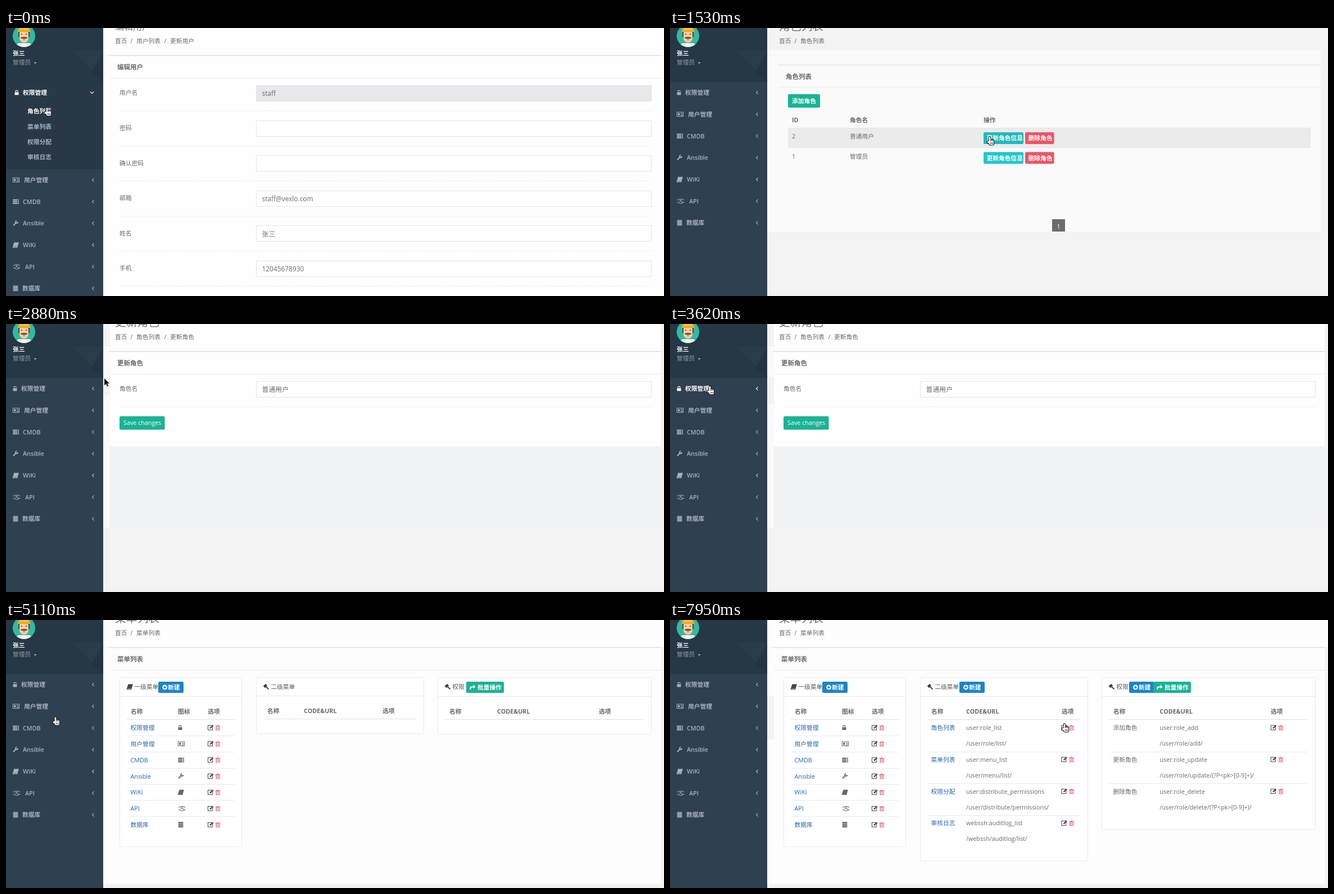
An HTML page with a canvas that plays this animation: 1171 px wide and 478 px high, repeating every 8000 ms.

```html
<!DOCTYPE html>
<html lang="zh-CN">
<head>
<meta charset="utf-8">
<title>权限管理</title>
<style>
html, body { margin: 0; width: 100%; height: 100%; overflow: hidden; background: #f3f3f4; }
canvas { display: block; width: 1171px; height: 478px; }
</style>
</head>
<body>
<canvas id="stage"></canvas>
<script>
const W = 1171, H = 478, LOOP = 8000;
const canvas = document.getElementById('stage');
const dpr = window.devicePixelRatio || 1;
canvas.width = W * dpr;
canvas.height = H * dpr;
const g = canvas.getContext('2d');

const FONT = '"Open Sans","Noto Sans CJK SC","Noto Sans CJK",sans-serif';
const GREY = '#676a6c', DARK = '#3f4244', LINE = '#e7eaec', BACK = '#f3f3f4', PAPER = '#fefefe';
const TEAL = '#1ab394', BLUE = '#1c84c6', RED = '#ed5565', LINK = '#2768a6', SIDE = '#a7b1c2';
const BASE = 10.75, PITCH = 38.7;

function rect(x, y, w, h, color, r = 0) {
  g.fillStyle = color;
  g.beginPath();
  g.roundRect(x, y, w, h, r);
  g.fill();
}

function frame(x, y, w, h, color, r = 0) {
  g.strokeStyle = color;
  g.lineWidth = 1;
  g.beginPath();
  g.roundRect(x + .5, y + .5, w - 1, h - 1, r);
  g.stroke();
}

function hline(x1, x2, y, color = LINE) { rect(x1, y, x2 - x1, 1, color); }

// y is the optical middle of the text
function text(s, x, y, color = GREY, weight = 400, size = BASE) {
  g.font = `${weight} ${size}px ${FONT}`;
  g.fillStyle = color;
  g.fillText(s, x, y + size * .37);
}

function trace(p) {
  g.beginPath();
  for (let i = 0; i < p.length; i += 2) g.lineTo(p[i], p[i + 1]);
}

function poly(color, ...p) {
  g.fillStyle = color;
  trace(p);
  g.fill();
}

// icon parts, in the current colour around 0,0
const bar = (x, y, w, h, r) => rect(x, y, w, h, g.fillStyle, r);
const box = (x, y, w, h) => g.strokeRect(x, y, w, h);

function pen(width, ...p) {
  g.lineWidth = width;
  trace(p);
  g.stroke();
}

function ring(x, y, r, from, to) {
  g.beginPath();
  g.arc(x, y, r, from, to);
  g.stroke();
}

function lock() {
  bar(-3.5, -.8, 7, 5);
  g.lineWidth = 1.4;
  ring(0, -1.7, 2.1, Math.PI, 0);
}
function card() {
  box(-5.7, -3.8, 11.4, 7.6);
  bar(-4, -2, 3.4, 4);
  for (let y = -2; y < 3; y += 2) bar(1, y, 3.4, 1);
}
function server() {
  for (let y = -4.2; y < 3; y += 3.1) {
    bar(-5.4, y, 8, 2.3);
    bar(3.4, y, 2, 2.3);
  }
}
function wrench() {
  pen(2, -4, 4, 1, -1);
  ring(2.2, -2.2, 2, 0, 4.7);
}
function book() {
  g.transform(1, 0, -.3, 1, 0, 0);
  bar(-4, -4.6, 8.5, 7.4);
  box(-3.6, 3, 7.8, 1.4);
}
function shake() {
  pen(1.1, -6, -2, -2, -3.4, 3, -3.4, 6, -2);
  pen(1.1, -6, 1.5, -1, 4, 2, 4, 6, 1.5);
  pen(1.1, 1, -3, -1.5, 0, 1, 0, 4, 2);
}
function disks() {
  for (let y = -5; y < 4; y += 2.6) bar(-4.6, y, 9.2, 2.1, 1);
}
function edit() {
  box(-4.6, -4, 8, 8);
  pen(2.2, -1, 1.2, 4.6, -4);
}
function trash() {
  box(-3, -2.4, 6, 6.6);
  pen(1, -4.2, -2.7, 4.2, -2.7);
  for (let x = -1; x < 2; x += 2) pen(.9, x, -1, x, 3);
  bar(-1.5, -4.4, 3, 1);
}
function gavel() {
  g.rotate(Math.PI / 4);
  bar(-4.5, -3, 4.6, 6);
  bar(0, -1, 6.5, 2);
}
function plus() {
  bar(-4.4, -4.4, 8.8, 8.8, 4.4);
  g.fillStyle = BLUE;
  bar(-2.6, -.8, 5.2, 1.6);
  bar(-.8, -2.6, 1.6, 5.2);
}
function share() {
  pen(2.2, -4.2, 4, -3.6, 0, 1, -1);
  poly('#fff', 1, -4.4, 5.2, -.9, 1, 2.6);
}
function left() { pen(1.1, 1.5, -3, -1.5, 0, 1.5, 3); }
function down() { pen(1.2, -3, -1.5, 0, 1.5, 3, -1.5); }

function icon(shape, x, y, color = GREY) {
  g.save();
  g.translate(x, y);
  g.fillStyle = g.strokeStyle = color;
  g.lineWidth = 1;
  shape();
  g.restore();
}

function button(x, y, w, h, color, label, tx, ico, weight = 600) {
  rect(x, y, w, h, color, 2.5);
  if (ico) icon(ico, x + 11.5, y + h / 2, '#fff');
  text(label, tx, y + h / 2, '#fff', weight);
}

// label, text x, icon, icon x
const MENU = [
  ['权限管理', 27, lock, 16], ['用户管理', 32, card, 18], ['CMDB', 30, server, 17.5],
  ['Ansible', 30, wrench, 17], ['WiKi', 30, book, 17], ['API', 34, shake, 19],
  ['数据库', 29, disks, 17]
];
const SUBMENU = ['角色列表', '菜单列表', '权限分配', '审核日志'];

function avatar() {
  g.save();
  g.beginPath();
  g.arc(32, 14, 20, 0, 7);
  g.clip();
  rect(12, -6, 40, 40, '#2fbba3');
  rect(19, 27, 26, 9, '#f4f4ee', 5);
  rect(22, 6, 20, 11, '#5d3a2b', 3);
  rect(24, 2, 16, 24, '#fbcfa5', 8);
  rect(23, -7, 18, 14, '#fcc92f', 8);
  rect(20, 3, 24, 4, '#f2a922', 2);
  for (const x of [27, 35]) rect(x, 10, 2, 2, '#40312b', 1);
  rect(26.5, 16, 11, 3, '#734330', 1.5);
  rect(29.5, 20, 5, 1.6, '#e8574f', .8);
  g.restore();
}

// open: how many pixels the submenu pushes the rest down
function sidebar(open, hot, hover) {
  rect(0, 0, 173, H, '#2f4050');
  rect(0, 0, 173, 96, '#263746');
  poly('#2a3b4a', 118, 40, 173, 40, 155, 78);
  poly('#233341', 173, 45, 173, 96, 150, 80);
  avatar();
  text('张三', 12, 45, '#fff', 700);
  text('管理员', 12, 61.5, '#8c9cab');
  poly('#8c9cab', 49, 61, 55, 61, 52, 64);
  if (open) rect(0, 96, 173, 39 + open, '#293846');
  MENU.forEach(([label, x, ico, ix], i) => {
    const active = open && !i, y = 115.2 + i * PITCH + (i ? open : 0);
    const c = active || (hover && !i) ? '#fff' : SIDE, dx = active ? 3 : 0;
    icon(ico, ix + dx, y, c);
    text(label, x + dx, y, c, 600);
    icon(active ? down : left, active ? 153 : 155, y, c);
  });
  if (!open) return;
  g.save();
  g.beginPath();
  g.rect(0, 130, 173, open + 5);
  g.clip();
  SUBMENU.forEach((s, i) => text(s, 38, 148.5 + i * 27.1, i === hot ? '#fff' : SIDE, 600));
  g.restore();
}

function heading(title, crumbs, size = 19.8) {
  text(title, 194, -3.4, GREY, 100, size);
  crumbs.forEach((c, i) => {
    const x = [194, 232, 292][i];
    if (i) text('/', x - 10.5, 23);
    text(c, x, 23);
  });
}

function panel(title) {
  hline(173, W, 48, '#eeeff0');
  rect(185, 48, 980, 2, '#e4e6e8');
  text(title, 198, 70, GREY, 600, 11.5);
  hline(185, 1165, 89);
}

function field(i, label, value, off) {
  const y = 102 + i * 62.6, foot = Math.round(y + 45) + .5;
  text(label, 202, y + 13.5);
  rect(445, y, 704, 28.5, off ? '#e6e9ec' : '#fff');
  frame(445, Math.round(y), 704, 29, '#e2e4e7');
  text(value, 455.5, y + 15, GREY, 400, 11.9);
  g.strokeStyle = LINE;
  g.setLineDash([2.5, 2]);
  pen(1, 202, foot, 1149, foot);
  g.setLineDash([]);
}

function userPage() {
  rect(173, 0, 998, H, PAPER);
  heading('编辑用户', ['首页', '用户列表', '更新用户'], 16);
  panel('编辑用户');
  const fields = [['用户名', 'staff', true], ['密码', ''], ['确认密码', ''],
    ['邮箱', 'staff@vexlo.com'], ['姓名', '张三'], ['手机', '12045678930']];
  fields.forEach((f, i) => field(i, ...f));
}

function rolesBack() {
  rect(173, 0, 998, H, BACK);
  rect(173, 40, 985, 323, '#fafafa');
  hline(173, W, 475);
}

function rolesPage(t) {
  const hover = t >= 1210;
  rolesBack();
  heading('角色列表', ['首页', '角色列表']);
  hline(173, W, 48, '#efeff0');
  rect(193, 65, 965, 2, LINE);
  text('角色列表', 206, 86.5, GREY, 600, 11.5);
  hline(193, 1158, 105);
  button(210, 118, 57, 24, TEAL, '添加角色', 217);
  text('ID', 217, 164.5, GREY, 700);
  text('角色名', 320, 164.5, GREY, 600);
  text('操作', 558, 164.5, GREY, 600);
  hline(210, 1140, 178, '#e4e4e4');
  if (hover) rect(210, 179, 930, 35, '#ebebeb');
  ['普通用户', '管理员'].forEach((name, i) => {
    const y = 186 + i * 35.3;
    text(String(2 - i), 217, y + 7.5);
    text(name, 320, y + 7.5);
    button(558, y, 71, 21, hover && !i ? '#21b9bb' : '#23c6c8', '更新角色信息', 563.5);
    button(632, y, 51.5, 21, RED, '删除角色', 637.5);
  });
  rect(680, 341, 23, 22, '#6c6c6c');
  text('1', 688.5, 354, '#fff');
}

function rolePage(t) {
  rolesBack();
  if (t >= 2880) rect(173, 95, 12, t < 3000 ? 32 : 47, BACK);
  rect(185, 0, 980, 218, PAPER);
  rect(185, 218, 980, 145, '#f1f2f4');
  heading('更新角色', ['首页', '角色列表', '更新角色']);
  panel('更新角色');
  field(0, '角色名', '普通用户');
  button(202, 164.5, 80.5, 24, TEAL, 'Save changes', 209, null, 400);
}

function block(x, w, h, head, ico, label) {
  rect(x, 102, w, h, '#fff', 3);
  frame(x, 102, w, h, LINE, 3);
  hline(x, x + w, head);
  icon(ico, x + 18, 119, DARK);
  text(label, x + 26.3, 119, '#55585a', 500);
}

function tableHead(x1, x2, y, names, xs) {
  names.forEach((s, i) => text(s, xs[i], y, GREY, s === 'CODE&URL' ? 700 : 600));
  hline(x1, x2, y + 14, '#dcdfe1');
}

function tools(x, y) {
  icon(edit, x, y, DARK);
  icon(trash, x + 13, y, RED);
}

function codeRows(rows, x, cx, ex, x1, x2, color) {
  rows.forEach(([name, code, url], i) => {
    const y = 192 + i * 56.8;
    text(name, x, y, color);
    text(code, cx, y);
    text(url, cx, y + 28);
    tools(ex, y);
    if (i < rows.length - 1) hline(x1, x2, Math.round(y + 42.5));
  });
}

const CODE_COLS = ['名称', 'CODE&URL', '选项'];
const CODES = [
  ['角色列表', 'user:role_list', '/user/role/list/'],
  ['菜单列表', 'user:menu_list', '/user/menu/list/'],
  ['权限分配', 'user:distribute_permissions', '/user/distribute/permissions/'],
  ['审核日志', 'webssh:auditlog_list', '/webssh/auditlog/list/']
];
const PERMS = [
  ['添加角色', 'user:role_add', '/user/role/add/'],
  ['更新角色', 'user:role_update', '/user/role/update/(?P<pk>[0-9]+)/'],
  ['删除角色', 'user:role_delete', '/user/role/delete/(?P<pk>[0-9]+)/']
];

const createButton = x => button(x, 110, 45, 20, BLUE, '新建', x + 17, plus);
const batchButton = x => button(x, 110, 67, 20, TEAL, '批量操作', x + 20, share);

function firstLevel() {
  block(202, 218, 303, 136, book, '一级菜单');
  createButton(271);
  tableHead(215, 407, 163, ['名称', '图标', '选项'], [222, 306, 359]);
  MENU.forEach(([label, , ico, ix], i) => {
    const y = 192 + i * 28.85;
    text(label, 221.5, y, LINK);
    icon(ico, 294 + ix, y);
    tools(364, y);
    if (i < 6) hline(215, 407, Math.round(y + 14));
  });
}

function secondLevel(full) {
  block(445, 299, full ? 328 : 101, full ? 136 : 135, gavel, '二级菜单');
  if (!full) return tableHead(458, 731, 162, CODE_COLS, [465, 530, 670]);
  createButton(515);
  tableHead(458, 731, 163, CODE_COLS, [465, 527, 697]);
  codeRows(CODES, 464.5, 527, 701.5, 458, 731, LINK);
}

function permissions(full) {
  block(768, 381, full ? 272 : 102, 136, gavel, '权限');
  tableHead(782, 1135, 163, CODE_COLS, full ? [789, 871.5, 1069] : [789, 874, 1055]);
  if (!full) return batchButton(819);
  createButton(817);
  batchButton(860);
  codeRows(PERMS, 788.5, 871.5, 1074, 782, 1135, GREY);
}

function menuPage(t) {
  rect(173, 0, 998, H, BACK);
  rect(173, 0, 992, 470, '#fdfdfd');
  rect(1165, 0, 6, 48, '#fdfdfd');
  hline(173, W, 475);
  if (t >= 5420) rect(173, 135, 12, 78, BACK);
  heading('菜单列表', ['首页', '菜单列表']);
  panel('菜单列表');
  firstLevel();
  secondLevel(t >= 6180);
  permissions(t >= 7660);
}

// start, end, steps, end x, end y, hand at the end
const LEGS = [
  [300, 1210, 5, 566, 191, 1], [1210, 1530, 2, 569, 194, 1], [1830, 2730, 6, 293, 121, 0],
  [2730, 2880, 1, 175, 97, 0], [2880, 3620, 5, 71, 111, 1], [3920, 4220, 2, 99, 169, 1],
  [4220, 4660, 3, 88, 173, 1], [5110, 5730, 4, 238, 187, 1], [6180, 6470, 2, 351, 246, 0],
  [6470, 7220, 5, 485, 187, 1], [7660, 7950, 2, 702, 185, 1]
];

// the pointer is caught in discrete steps along eased legs
function pointer(t) {
  let x = 73, y = 142, hand = 1;
  for (const [from, to, steps, ex, ey, end] of LEGS) {
    const n = Math.min(steps, Math.floor((t - from) / (to - from) * steps + 1e-6));
    if (n <= 0) break;
    const u = n / steps, k = u * u * (3 - 2 * u);
    x += (ex - x) * k;
    y += (ey - y) * k;
    hand = x < 172 || (end && Math.hypot(ex - x, ey - y) < 16);
    if (n < steps) break;
  }
  return { x: Math.round(x), y: Math.round(y), hand };
}

function handShape() {
  g.beginPath();
  g.roundRect(-1.3, 0, 2.6, 10, 1.3);
  g.roundRect(-1.3, 5, 8.4, 9.6, 2.5);
  g.roundRect(-4.4, 7.6, 5.5, 3.6, 1.8);
}

function cursor(t) {
  const p = pointer(t);
  g.save();
  g.translate(p.x, p.y);
  g.lineJoin = 'round';
  g.lineWidth = 2;
  if (p.hand) {
    g.strokeStyle = '#111';
    g.fillStyle = '#fff';
    handShape();
    g.stroke();
    g.fill();
    for (let x = 1.4; x < 6; x += 2) pen(.9, x, 5, x, 8);
    for (let x = 1.4; x < 6; x += 2) pen(.8, x, 10, x, 13);
  } else {
    g.strokeStyle = '#fff';
    const arrow = [0, 0, 0, 12.6, 3, 9.9, 5, 14.4, 7.2, 13.4, 5.2, 9.1, 9.2, 9.1, 0, 0];
    pen(2, ...arrow);
    poly('#111', ...arrow);
  }
  g.restore();
}

function draw(t) {
  g.setTransform(dpr, 0, 0, dpr, 0, 0);
  if (t < 300) userPage();
  else if (t < 1830) rolesPage(t);
  else if (t < 5110) rolePage(t);
  else menuPage(t);

  let open = 0, hot = -1;
  if (t < 300) {
    open = 117;
    hot = 0;
  } else if (t >= 4070 && t < 5110) {
    open = t < 4220 ? 78 : t < 4360 ? 114.5 : 117;
    hot = t < 4220 ? -1 : 1;
  }
  sidebar(open, hot, t >= 3028 && t < 4070);
  cursor(t);
}

const start = performance.now();
function tick() {
  draw((performance.now() - start) % LOOP);
  requestAnimationFrame(tick);
}
tick();
</script>
</body>
</html>
```
